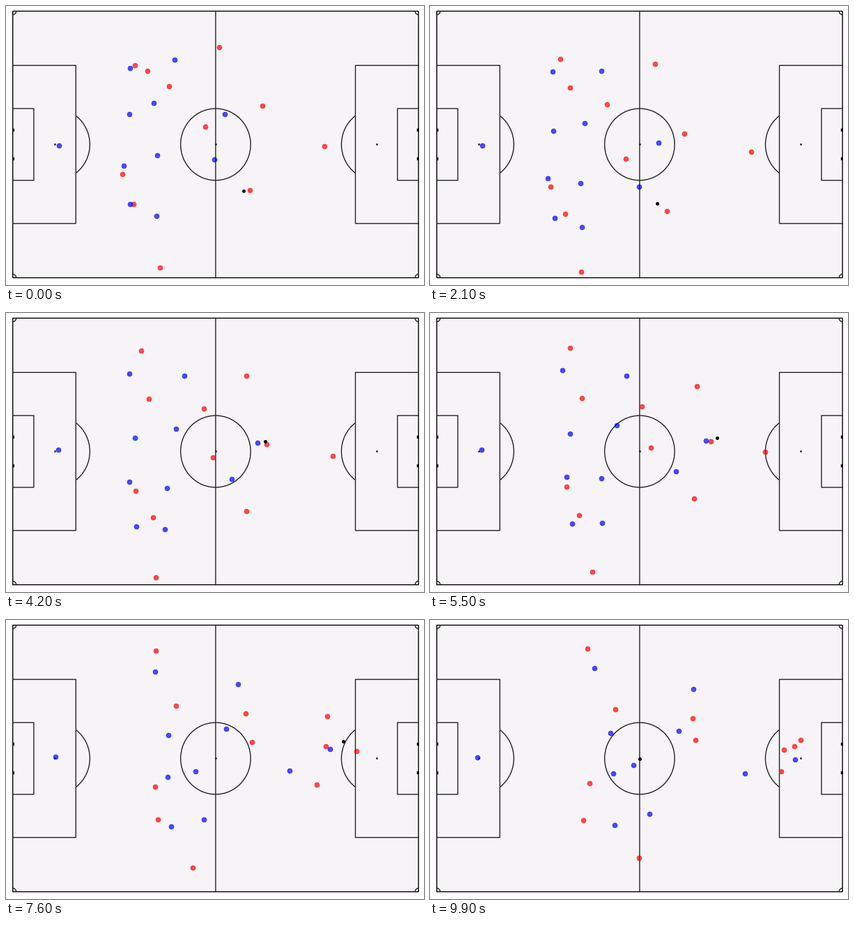
These frames come from a looping animation (600x400 px, 10000 ms). A matplotlib script:

```python
import numpy as np
import matplotlib.pyplot as plt
from matplotlib.animation import FuncAnimation
from matplotlib.patches import Arc, Rectangle

plt.rcParams["path.snap"] = False

W, H, DPI = 600, 400, 100
FRAMES, STEP = 100, 100
TURN, LAST = 4.2, 9.9  # seconds: change of play, end of the attack

# Each player: place at the start, at the change of play and at the end
RED = [
    [(186, 86), (195, 55), (227, 42)],
    [(204, 94), (206, 124), (267, 129)],
    [(235, 116), (285, 138), (378, 142)],
    [(168, 242), (187, 256), (230, 235)],
    [(184, 285), (212, 294), (221, 288)],
    [(222, 376), (216, 380), (301, 342)],
    [(307, 60), (346, 91), (533, 173)],
    [(369, 144), (375, 189), (509, 187)],
    [(287, 174), (298, 208), (382, 173)],
    [(458, 202), (470, 206), (524, 182)],
    [(351, 265), (346, 285), (505, 218)],
]
BLUE = [
    [(77, 201), (76, 197), (69, 198)],
    [(179, 90), (178, 88), (237, 70)],
    [(178, 156), (186, 180), (260, 163)],
    [(170, 230), (178, 243), (264, 221)],
    [(179, 285), (188, 307), (266, 295)],
    [(243, 78), (257, 91), (379, 100)],
    [(213, 140), (245, 167), (358, 160)],
    [(315, 156), (362, 187), (525, 201)],
    [(300, 221), (325, 239), (453, 221)],
    [(218, 215), (232, 252), (293, 209)],
    [(217, 302), (229, 311), (316, 279)],
]
# Dribble, pass, interception, run and shot: time, x, y
BALL = [(0, 341.6, 265.2), (1.2, 326.6, 283.2), (2.1, 327, 284), (3.1, 365.2, 211.8),
        (4.2, 372.8, 184.7), (7.4, 471.5, 173), (9.0, 579.2, 187)]
KICKOFF = (301.3, 199.2)


def team_at(keys, t):
    """Walk between key places; players near the centre swing out further."""
    start, turn, end = np.moveaxis(np.array(keys, float), 1, 0)
    if t < TURN:
        u = t / TURN
        place, swing = start + (turn - start) * u, np.sin(np.pi * u)
    else:
        u = (t - TURN) / (LAST - TURN)
        ease = u - 0.03 * np.sin(2 * np.pi * u)
        place, swing = turn + (end - turn) * ease, -0.4 * np.sin(np.pi * u)
    far = np.hypot(*(start - (295, 205)).T)
    pull = np.exp(-(far / 90) ** 2 / 2)
    return place + swing * pull[:, None] * (-12, 30)


def ball_at(t):
    times, x, y = zip(*BALL)
    if t > times[-1] + 0.05:
        return np.array([KICKOFF])
    return np.array([[np.interp(t, times, x), np.interp(t, times, y)]])


fig = plt.figure(figsize=(W / DPI, H / DPI), dpi=DPI, facecolor="white")
ax = fig.add_axes([0, 0, 1, 1])
ax.set(xlim=(0.6, W + 0.6), ylim=(H + 0.6, 0.6))
ax.axis("off")

# Pitch geometry in metres, scaled to the stage
LEFT, RIGHT, TOP, BOTTOM = 10.3, 592.7, 8, 390.2
MID_X, MID_Y = (LEFT + RIGHT) / 2, (TOP + BOTTOM) / 2
MX, MY = 5.49, 5.62
INK = dict(color="#222224", lw=1)


def arc(x, y, radius, start=0, end=360):
    ax.add_patch(Arc((x, y), 2 * radius * MX, 2 * radius * MY,
                     theta1=start, theta2=end, **INK))


def spot(x):
    ax.plot(x, MID_Y, "o", color="#222224", ms=1.7, mew=0.3)


def draw_end(x, side):
    for depth, half in ((16.5, 20.16), (5.5, 9.16)):
        edge = x + side * depth * MX
        ax.plot([x, edge, edge, x],
                [MID_Y - half * MY] * 2 + [MID_Y + half * MY] * 2, **INK)
    spot(x + side * 11 * MX)
    turn = 0 if side > 0 else 180
    arc(x + side * 11 * MX, MID_Y, 9.15, turn - 53, turn + 53)
    for sign in (-1, 1):
        post = MID_Y + sign * 3.66 * MY
        ax.add_patch(Rectangle((x + side * 0.9 - 1.4, post - 2.2), 2.8, 4.4,
                               fc="black", lw=0, zorder=2))
        corner = 45 - 45 * side if sign < 0 else 225 + 45 * side
        arc(x, MID_Y + sign * (BOTTOM - TOP) / 2, 0.9, corner, corner + 90)


def draw_pitch():
    ax.add_patch(Rectangle((LEFT, TOP), RIGHT - LEFT, BOTTOM - TOP,
                           fc="#f6f4f7", ec="black", lw=1, zorder=0.5))
    ax.plot([MID_X, MID_X], [TOP, BOTTOM], **INK)
    arc(MID_X, MID_Y, 9.15)
    spot(MID_X)
    draw_end(LEFT, 1)
    draw_end(RIGHT, -1)


def dots(color, size, alpha=1):
    return ax.plot([], [], "o", color=color, ms=size, mew=0.5, alpha=alpha, zorder=3)[0]


draw_pitch()
reds, blues, ball = dots("red", 5, 0.7), dots("blue", 5, 0.7), dots("black", 3)


def update(i):
    t = i * STEP / 1000
    reds.set_data(*team_at(RED, t).T)
    blues.set_data(*team_at(BLUE, t).T)
    ball.set_data(*ball_at(t).T)
    return reds, blues, ball


anim = FuncAnimation(fig, update, frames=FRAMES, interval=STEP, repeat=True, repeat_delay=0)
plt.show()
```
